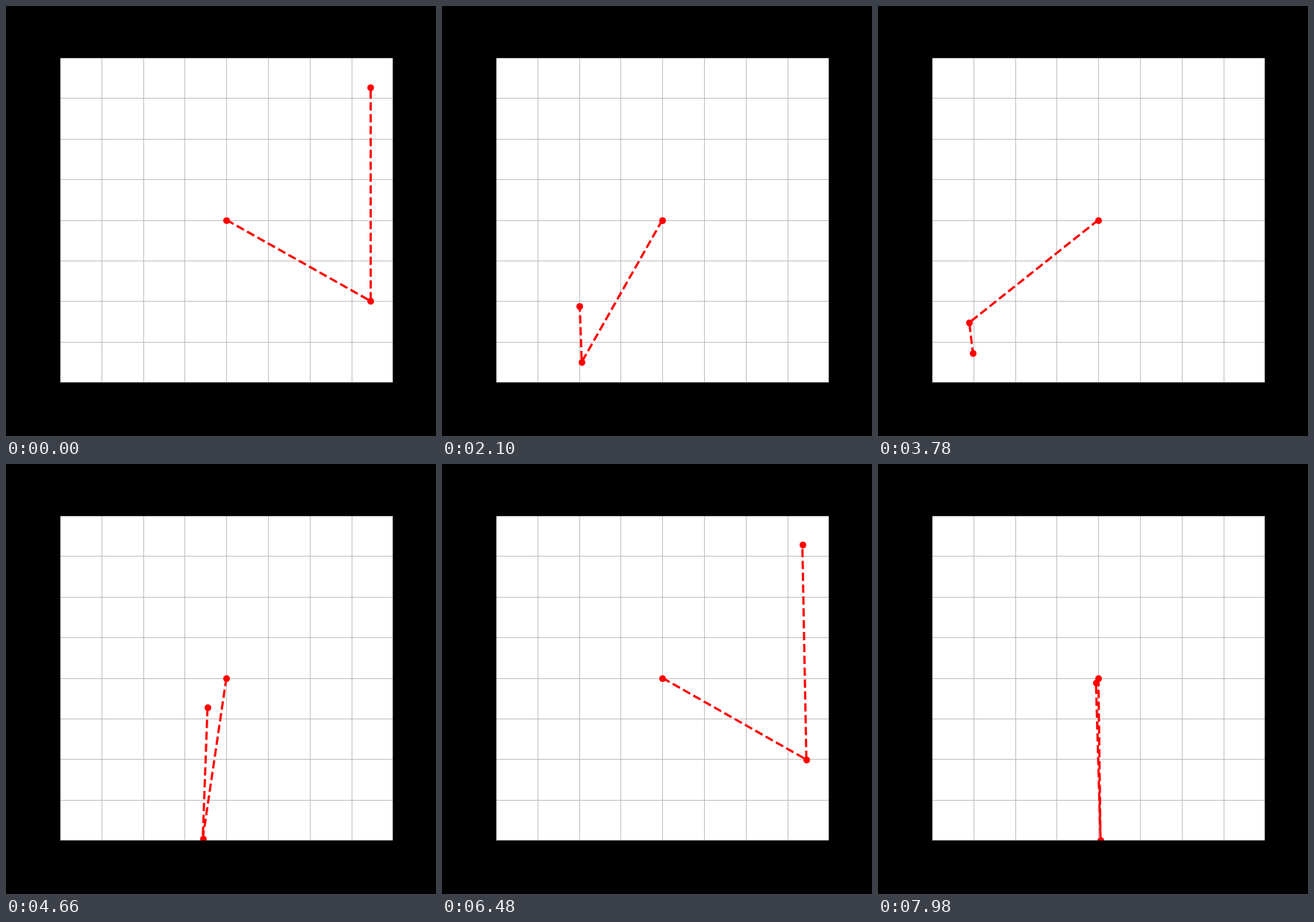
An HTML page with a canvas for the animation above (8000 ms loop, 576 by 576 pixels).

```html
<!DOCTYPE html>
<html lang="en">
<head>
<meta charset="utf-8">
<title>Swinging linkage</title>
<style>
  html, body { margin: 0; width: 100%; height: 100%; overflow: hidden; background: #000; }
  canvas { display: block; }
</style>
</head>
<body>
<canvas width="576" height="576"></canvas>
<script>
const ctx = document.querySelector('canvas').getContext('2d');

const LOOP = 8000, STEP = 20;
const LEFT = 72, RIGHT = 518.4, TOP = 69.12, BOTTOM = 504;
const CELLS = 8;
const UNIT_X = (RIGHT - LEFT) / CELLS, UNIT_Y = (BOTTOM - TOP) / CELLS;
const ARM = 4, TIP = 0.2;

const toScreen = (x, y) => [(LEFT + RIGHT) / 2 + x * UNIT_X, (TOP + BOTTOM) / 2 - y * UNIT_Y];
const snap = v => Math.round(v) + 0.5;

// Free pendulum released at 60 degrees, as the first terms of its Fourier series.
function armAngle(t) {
  const phase = 0.9827 * t;
  return 1.05354 * Math.cos(phase) - 0.00642 * Math.cos(3 * phase) + 0.00007 * Math.cos(5 * phase);
}

// The short tip starts at rest and builds up a beating swing.
const tipAngle = t => -0.8 * Math.sin(0.2 * t) * Math.sin(1.08 * t);

function joints(t) {
  const a = armAngle(t), b = tipAngle(t);
  const x = ARM * Math.sin(a), y = -ARM * Math.cos(a);
  return [
    toScreen(0, 0),
    toScreen(x, y),
    toScreen(x + TIP * Math.sin(b), x - TIP * Math.cos(b))
  ];
}

function line(x1, y1, x2, y2) {
  ctx.beginPath();
  ctx.moveTo(x1, y1);
  ctx.lineTo(x2, y2);
  ctx.stroke();
}

function drawGrid() {
  ctx.fillStyle = '#000';
  ctx.fillRect(0, 0, 576, 576);
  ctx.fillStyle = '#fff';
  ctx.fillRect(72, 69, 446, 436);
  ctx.strokeStyle = '#b0b0b0';
  ctx.lineWidth = 0.8;
  for (let i = 1; i < CELLS; i++) {
    const x = snap(LEFT + i * UNIT_X), y = snap(TOP + i * UNIT_Y);
    line(x, TOP, x, BOTTOM);
    line(LEFT, y, RIGHT, y);
  }
}

function drawLinkage(points) {
  ctx.save();
  ctx.beginPath();
  ctx.rect(72, 69, 446, 436);
  ctx.clip();

  ctx.strokeStyle = ctx.fillStyle = '#f00';
  ctx.lineWidth = 3;
  ctx.lineJoin = 'round';
  ctx.setLineDash([11.1, 4.8]);
  ctx.beginPath();
  for (const p of points) ctx.lineTo(...p);
  ctx.stroke();

  for (const [x, y] of points) {
    ctx.beginPath();
    ctx.arc(snap(x), snap(y), 4.5, 0, 2 * Math.PI);
    ctx.fill();
  }
  ctx.restore();
}

function drawFrame() {
  ctx.strokeStyle = '#000';
  ctx.lineWidth = 0.8;
  ctx.strokeRect(snap(LEFT), snap(TOP), snap(RIGHT) - snap(LEFT), snap(BOTTOM) - snap(TOP));
}

const start = performance.now();
function render() {
  const elapsed = (performance.now() - start) % LOOP;
  const t = Math.floor(elapsed / STEP) * STEP / 1000;
  drawGrid();
  drawLinkage(joints(t));
  drawFrame();
  requestAnimationFrame(render);
}
render();
</script>
</body>
</html>
```
